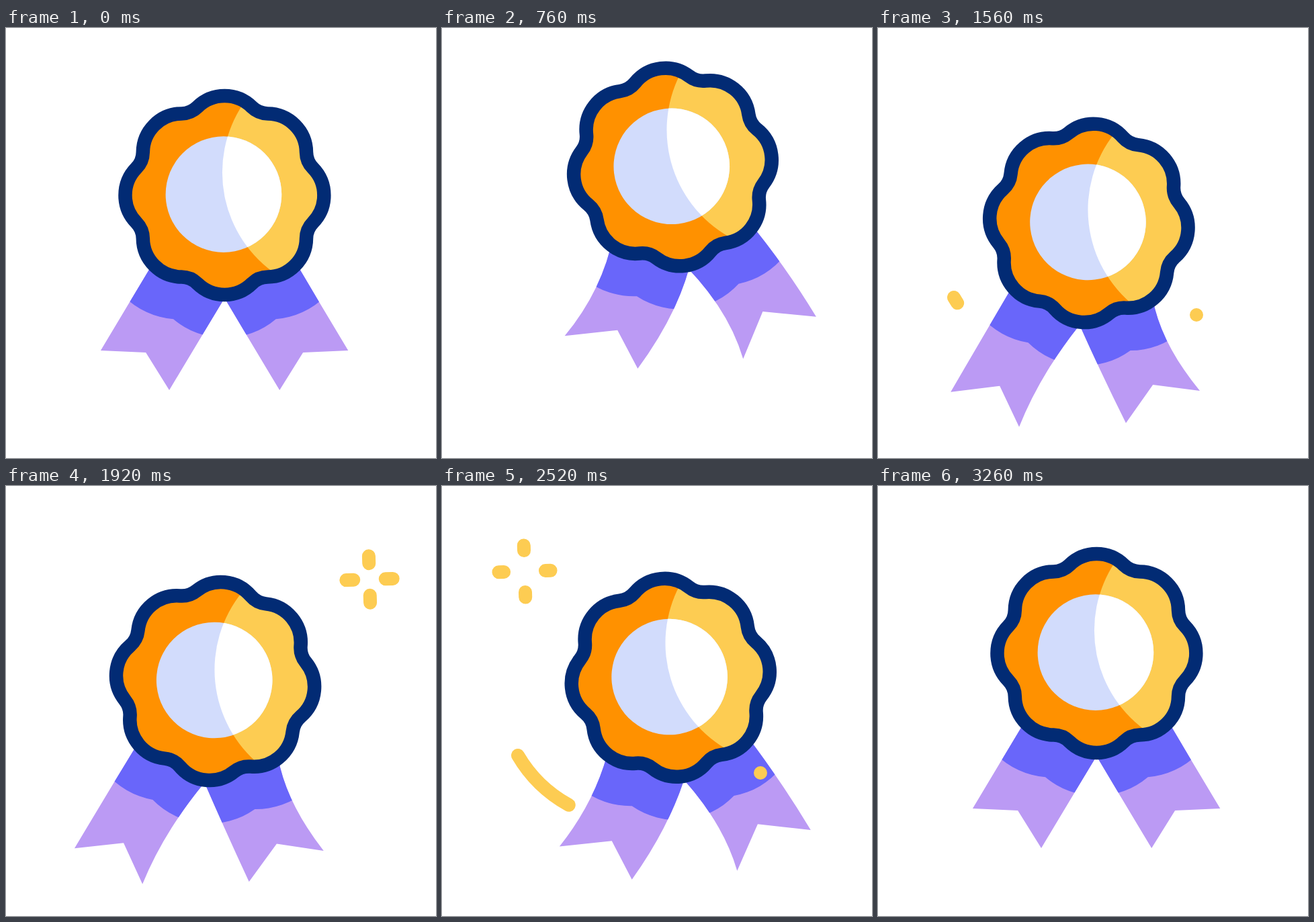
Write an HTML page that moves like this. It is 640 px wide and 640 px high and loops after 3.48 s.

```html
<!DOCTYPE html>
<html lang="en">
<head>
<meta charset="utf-8">
<title>Award ribbon</title>
<style>
  html, body { margin: 0; width: 100%; height: 100%; overflow: hidden; background: #fff; }
  svg { display: block; width: 100vw; height: 100vh; }
  .line { fill: none; stroke: #fdcc52; stroke-width: 20; stroke-linecap: round; }
</style>
</head>
<body>
<svg viewBox="0 0 640 640">
  <defs>
    <clipPath id="tails"><path id="clipL"/><path id="clipR"/></clipPath>
    <clipPath id="inBadge"><path id="face"/></clipPath>
    <clipPath id="inDisc"><circle cx="-1.5" cy="-1.4" r="86.3"/></clipPath>
  </defs>
  <g id="award">
    <path id="tailL" fill="#bb9af4"/>
    <path id="tailR" fill="#bb9af4"/>
    <path id="shade" fill="#6966fa" clip-path="url(#tails)"/>
    <g clip-path="url(#inBadge)">
      <rect x="-160" y="-160" width="320" height="320" fill="#ff9100"/>
      <circle cx="179.5" cy="-34" r="183" fill="#fdcc52"/>
    </g>
    <g clip-path="url(#inDisc)">
      <rect x="-90" y="-90" width="180" height="180" fill="#d2dcfc"/>
      <circle cx="179.5" cy="-34" r="183" fill="#fff"/>
    </g>
    <path id="rim" fill="none" stroke="#022b74" stroke-width="20.5"/>
  </g>
  <path id="swoosh" class="line" d="M474 427C446 514 203 555 113 401"/>
  <g id="sparks"></g>
</svg>
<script>
const $ = id => document.getElementById(id);
const LOOP = 3480;
const clamp = u => Math.min(1, Math.max(0, u));
const mix = (a, b, u) => a + (b - a) * u;
const sine = u => (1 - Math.cos(Math.PI * clamp(u))) / 2;
const easeOut = u => 1 - (1 - clamp(u)) ** 2;
const span = (t, from, to) => clamp((t - from) / (to - from));

// Smooth track through [time, value] keys that never overshoots them
function track(...keys) {
  const rise = keys.slice(1).map((k, i) => (k[1] - keys[i][1]) / (k[0] - keys[i][0]));
  const slope = keys.map((k, i) => {
    const a = rise[i - 1], b = rise[i];
    return i && i < rise.length && a * b > 0 ? 2 * a * b / (a + b) : 0;
  });
  return t => {
    if (t <= keys[0][0]) return keys[0][1];
    const n = keys.findIndex(k => k[0] > t);
    if (n < 0) return keys[keys.length - 1][1];
    const [t0, a] = keys[n - 1], [t1, b] = keys[n];
    const h = t1 - t0, u = (t - t0) / h, v = 1 - u;
    return a * (1 + 2 * u) * v * v + b * (3 - 2 * u) * u * u
      + h * u * v * (slope[n - 1] * v - slope[n] * u);
  };
}

const swing = track([120, 0], [640, 13.7], [760, 18], [870, 21], [1200, 8], [1560, -11.5],
  [1800, -20], [2220, 16], [2320, 19], [2760, 6.7], [3050, 0.6], [3260, 0]);
const lift = track([120, 0], [640, -44], [760, -42], [980, -20], [1200, 15], [1400, 37],
  [1585, 41.5], [2230, 41.5], [2500, 37], [2760, 19.5], [3000, 4.2], [3260, 0]);
const bend = track([120, 0], [620, 1], [2760, 1], [3260, 0]);
const dropL = track([900, 0], [1200, 0.27], [1560, 1], [1780, 1.1], [2220, 0.6], [2650, 0]);
const dropR = track([1200, 0], [1560, 1], [1780, 1.1], [2220, 0.4], [2650, 0]);

const polar = (r, deg) => {
  const a = deg * Math.PI / 180;
  return (r * Math.cos(a)).toFixed(2) + ' ' + (r * Math.sin(a)).toFixed(2);
};

function scallop() {
  const half = 17.17, r = 137.5;
  let d = 'M' + polar(r, -half);
  for (let a = 0; a < 360; a += 45)
    d += `A58 58 0 0 1 ${polar(r, a + half)}A34.5 34.5 0 0 0 ${polar(r, a + 45 - half)}`;
  return d + 'Z';
}

function cloud() {
  let d = 'M' + polar(199.5, -22.5);
  for (let a = 22.5; a < 360; a += 45) d += 'A118 118 0 0 1 ' + polar(199.5, a);
  return d + 'Z';
}

$('rim').setAttribute('d', scallop());
$('face').setAttribute('d', scallop());
$('shade').setAttribute('d', cloud());

// Tail poses: outer edge middle, outer tip, notch, inner tip, inner edge middle
const rest = [[-142.3, 160.5], [-184.5, 231], [-117.3, 234], [-82.4, 290], [-33.8, 209]];
const left = {
  side: 1,
  rest,
  bent: [[-135, 164], [-190, 230], [-111, 231], [-88, 291.5], [-24, 210]],
  drop: [[-142.8, 178], [-185.6, 266.5], [-113.5, 252], [-80, 310.5], [-42, 219]]
};
const right = {
  side: -1,
  rest: rest.map(([x, y]) => [-x - 0.6, y]),
  bent: [[146, 168], [185, 247], [107, 229.5], [69.5, 296], [41.5, 212]],
  drop: [[128, 163], [184, 236], [113.7, 232.5], [78, 292.4], [30, 210]]
};

function tail({ side, rest, bent, drop }, b, k) {
  const [m1, tip, notch, end, m2] = rest.map((p, i) =>
    p.map((v, c) => mix(mix(v, bent[i][c], b), drop[i][c], k)));
  const top = [-100 * side, 90], root = [15 * side, 128];
  const ctrl = (s, m, e) => m.map((v, c) => 2 * v - (s[c] + e[c]) / 2);
  return `M${top}Q${ctrl(top, m1, tip)} ${tip}L${notch}L${end}Q${ctrl(end, m2, root)} ${root}Z`;
}

function drawTail(name, pose, b, k) {
  const d = tail(pose, b, k);
  $('tail' + name).setAttribute('d', d);
  $('clip' + name).setAttribute('d', d);
}

const swoosh = $('swoosh'), length = swoosh.getTotalLength();

function drawSwoosh(t) {
  const start = t < 1800 ? 960 : 2015;
  const head = sine(span(t, start, start + 300)) * length;
  const back = sine(span(t, start + 240, start + 640)) * length;
  const on = head - back > 0.05;
  swoosh.style.display = on ? '' : 'none';
  if (on) swoosh.setAttribute('stroke-dasharray', `0 ${back} ${head - back} ${2 * length}`);
}

const sparks = [[107.8, 290.3, 1060], [541, 139, 1745], [123, 127, 2285]].map(([x, y, start]) => {
  const path = document.createElementNS('http://www.w3.org/2000/svg', 'path');
  path.setAttribute('class', 'line');
  path.setAttribute('transform', `translate(${x} ${y}) rotate(-1.8)`);
  $('sparks').append(path);
  return { path, start };
});

function drawSpark({ path, start }, t) {
  const p = (t - start) / 440, on = p > 0 && p < 1;
  path.style.display = on ? '' : 'none';
  if (!on) return;
  const far = 39 * easeOut(p / 0.6);
  const near = Math.min(far - 0.01, 39 * easeOut((p - 0.1) / 0.8));
  path.style.strokeWidth = 20 * Math.min(1, p / 0.15, (1 - p) / 0.4);
  path.setAttribute('d', [0, 90, 180, 270]
    .map(a => `M${polar(near, a)}L${polar(far, a)}`).join(''));
}

function draw(t) {
  const x = swing(t), b = bend(t);
  $('award').setAttribute('transform',
    `translate(${325.4 + x} ${249 + lift(t)}) rotate(${-0.385 * x})`);
  drawTail('L', left, b, dropL(t));
  drawTail('R', right, b, dropR(t));
  drawSwoosh(t);
  sparks.forEach(s => drawSpark(s, t));
}

const begin = performance.now();
function tick() {
  draw((performance.now() - begin) % LOOP);
  requestAnimationFrame(tick);
}
tick();
</script>
</body>
</html>
```
